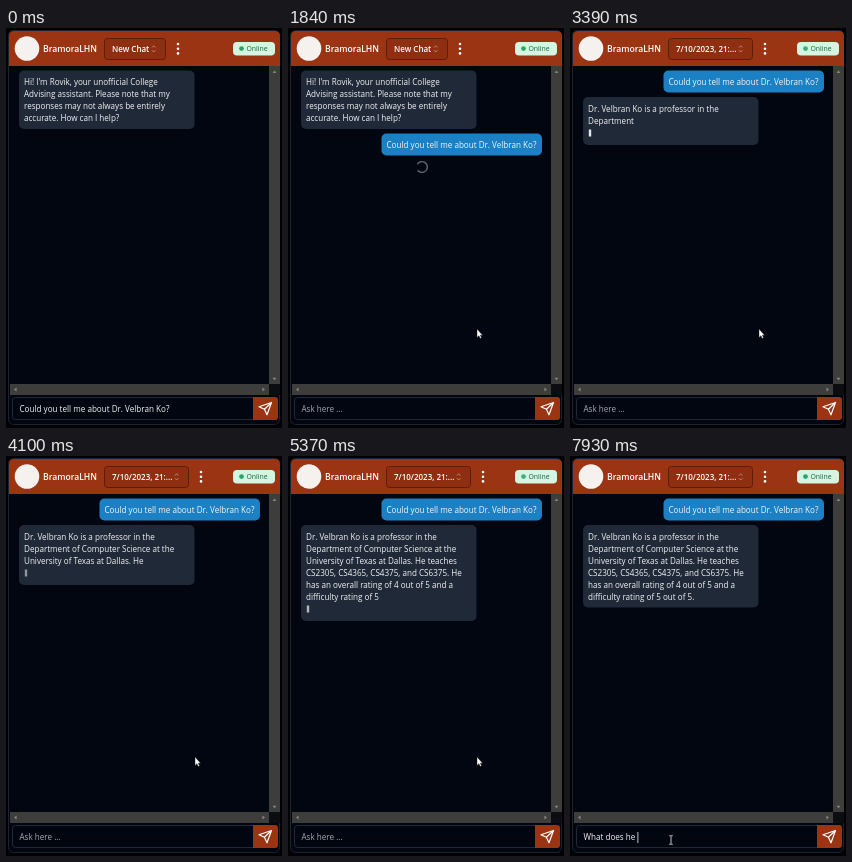
Animation, 276 px wide and 400 px high, one loop 8 s. Source, as an HTML page:

```html
<!DOCTYPE html>
<html lang="en">
<head>
<meta charset="utf-8">
<title>Advising chat</title>
<style>
  html, body { margin: 0; width: 100%; height: 100%; overflow: hidden; background: #010103; }
  svg { display: block; width: 276px; height: 400px; }
  text { font: 8.1px "Open Sans", "Noto Sans", sans-serif; fill: #f3f4f6; white-space: pre; }
  .bold { font-weight: 600; font-size: 8px; fill: #fff; }
  .bubble { fill: #1f2937; }
  .bar { fill: #3d3d3b; }
  .arrow { fill: #85857f; }
  .icon { fill: none; stroke: #fff; stroke-linecap: round; stroke-linejoin: round; }
</style>
</head>
<body>
<svg viewBox="0 0 276 400">
  <rect x="2.5" y="2.5" width="271" height="394" rx="5" fill="#020611" stroke="#1b2330"/>
  <path d="M3 38V8q0-5 5-5H269q5 0 5 5V38Z" fill="#9a3412"/>

  <circle cx="21" cy="20.5" r="12.3" fill="#f4f1ee"/>
  <text class="bold" x="37" y="24" style="font-size:8.6px">BramoraLHN</text>
  <rect id="select" x="98.5" y="10.5" height="21" rx="3" fill="#8f2f11" stroke="#5c1d0b"/>
  <text id="chat" class="bold" x="106" y="24"></text>
  <path id="chevrons" class="icon" d="M-1.5 19.3L0 17.8L1.5 19.3M-1.5 22.5L0 24L1.5 22.5" style="stroke:#d6a999;stroke-width:.7"/>
  <g id="menu" fill="#fff">
    <circle cy="16" r="1.3"/><circle cy="20.7" r="1.3"/><circle cy="25.4" r="1.3"/>
  </g>
  <rect x="227" y="14" width="42" height="13.5" rx="4" fill="#d5f5e3"/>
  <circle id="dot" cx="235.5" cy="20.6" r="2.4" fill="#27a567"/>
  <text x="240.5" y="23.3" style="font-size:6.9px;font-weight:500;fill:#17633c">Online</text>

  <g id="greeting">
    <rect class="bubble" x="13" y="42.5" width="175.5" height="58.5" rx="5"/>
  </g>
  <g id="question">
    <rect x="93.5" y="42.5" width="160.5" height="22" rx="5" fill="#1c80c5"/>
    <text x="98.5" y="56.7">Could you tell me about Dr. Velbran Ko?</text>
  </g>
  <circle id="spinner" cx="134" cy="139" r="5.4" fill="none" stroke="#606570" stroke-width="1.4" stroke-dasharray="27 6.93"/>
  <g id="answer">
    <rect id="box" class="bubble" x="13" y="69" rx="5"/>
    <rect id="caret" x="18.8" width="2.4" height="7" fill="#e5e7eb"/>
  </g>

  <path class="bar" d="M263 38H274V356H263ZM4 356H263V367H4Z"/>
  <path d="M263 356H274V367H263Z" fill="#0c0d10"/>
  <path class="arrow" d="M268.5 42.5l2 2.6h-4ZM268.5 352.3l2-2.6h-4ZM8 361.5l2.6-2v4ZM259 361.5l-2.6-2v4Z"/>

  <rect x="6.5" y="369.5" width="265" height="22" rx="3" fill="#020611" stroke="#1f2937"/>
  <path d="M247 369H269q3 0 3 3V389q0 3-3 3H247Z" fill="#9a3412"/>
  <path class="icon" d="M265.5 374.5L253 378.8L258.4 381.3L261 386.8ZM265.5 374.5L258.4 381.3" stroke-width="1.2"/>
  <text id="input" x="13.5" y="383.8"></text>
  <path id="textCaret" d="M0 376V387" stroke="#f3f4f6" stroke-width=".8"/>

  <path id="arrow" d="M0 0V8.4L1.9 6.7L3.2 9.4L4.5 8.8L3.3 6.2H5.6Z" fill="#fff" stroke="#111" stroke-width=".4"/>
  <path id="beam" d="M-1.7-4.3H-.4L0-3.9L.4-4.3H1.7M0-3.9V3.9M-1.7 4.3H-.4L0 3.9L.4 4.3H1.7" fill="none" stroke="#f3f4f6" stroke-width=".8"/>
</svg>
<script>
const $ = id => document.getElementById(id);
const show = (id, on) => $(id).style.display = on ? "" : "none";
const move = (id, x, y = 0) => $(id).setAttribute("transform", `translate(${x} ${y})`);
const LOOP = 8000, SENT = 690, REPLY = 2600, SWITCH = 2750, DONE = 5660, FOCUS = 7060, TYPE = 7365;

function addLine(parent, y, string) {
  const line = document.createElementNS("http://www.w3.org/2000/svg", "text");
  line.setAttribute("x", 18);
  line.setAttribute("y", y);
  line.textContent = string;
  $(parent).append(line);
  return line;
}

["Hi! I'm Rovik, your unofficial College",
 "Advising assistant. Please note that my",
 "responses may not always be entirely",
 "accurate. How can I help?"].forEach((s, i) => addLine("greeting", 57 + 12 * i, s));

const reply = [
  "Dr. Velbran Ko is a professor in the",
  "Department of Computer Science at the",
  "University of Texas at Dallas. He teaches",
  "CS2305, CS4365, CS4375, and CS6375. He",
  "has an overall rating of 4 out of 5 and a",
  "difficulty rating of 5 out of 5."
].map(s => s.split(" "));
const replyLines = reply.map((_, i) => addLine("answer", 83.7 + 12 * i, ""));

// Pointer path: time, x, y
const path = [[140, 256, 397], [420, 255, 384], [800, 255, 384], [1690, 189, 301],
              [6200, 189, 301], [6510, 187, 303], [7060, 101, 384], [LOOP, 101, 384]];

function pointerAt(t) {
  const i = Math.max(1, path.findIndex(p => p[0] > t));
  const [t0, x0, y0] = path[i - 1], [t1, x1, y1] = path[i];
  const k = Math.max(0, (t - t0) / (t1 - t0)), e = k * k * (3 - 2 * k);
  return [x0 + (x1 - x0) * e, y0 + (y1 - y0) * e];
}

function drawHeader(t) {
  const named = t >= SWITCH, shift = named ? 23 : 0;
  $("select").setAttribute("width", 61 + shift);
  $("chat").textContent = named ? "7/10/2023, 21:..." : "New Chat";
  move("chevrons", 147.7 + shift);
  move("menu", 172 + shift);
  $("dot").style.opacity = .9 + .1 * Math.cos(t * Math.PI / 1000);
}

function drawAnswer(t) {
  show("answer", t >= REPLY);
  if (t < REPLY) return;
  let left = Math.max(0, Math.floor((t - 2845) / 60)), used = 0;
  replyLines.forEach((line, i) => {
    const words = reply[i].slice(0, left);
    left -= words.length;
    line.textContent = words.join(" ");
    if (words.length) used++;
  });
  const typing = t < DONE, rows = Math.max(1, used + typing);
  const width = used > 1 ? 175.5 : Math.max(15, replyLines[0].getComputedTextLength() + 10);
  $("box").setAttribute("width", width);
  $("box").setAttribute("height", 12 * rows + (typing ? 12 : 10.5));
  $("caret").setAttribute("y", 77.5 + 12 * used);
  $("caret").style.opacity = .75 - .25 * Math.cos((t - 2830) / 1130 * 2 * Math.PI);
  show("caret", typing);
  move("answer", 0, t < SWITCH ? 80 : 0);
}

function drawInput(t) {
  const typed = "What does he ".slice(0, Math.max(0, Math.floor(1 + (t - TYPE) / 46)));
  const value = t < SENT ? "Could you tell me about Dr. Velbran Ko?" : t < TYPE ? "" : typed;
  const input = $("input");
  input.textContent = value || "Ask here ...";
  input.style.fill = value ? "#f3f4f6" : "#a3a8b1";
  show("textCaret", t >= FOCUS);
  move("textCaret", value ? 14 + input.getComputedTextLength() : 13.5);
}

function draw(t) {
  drawHeader(t);
  show("greeting", t < SWITCH);
  show("question", t >= SENT);
  move("question", 0, t < SWITCH ? 63 : 0);
  show("spinner", t >= SENT && t < SWITCH);
  $("spinner").setAttribute("transform", `rotate(${(t - 1840) * .36 + 210} 134 139)`);
  drawAnswer(t);
  drawInput(t);

  const [x, y] = pointerAt(t), overInput = t > 6500 && y > 369;
  show("arrow", t >= 140 && !overInput);
  show("beam", overInput);
  move("arrow", x, y);
  move("beam", x, y);
}

function tick() {
  draw(performance.now() % LOOP);
  requestAnimationFrame(tick);
}
tick();
</script>
</body>
</html>
```
